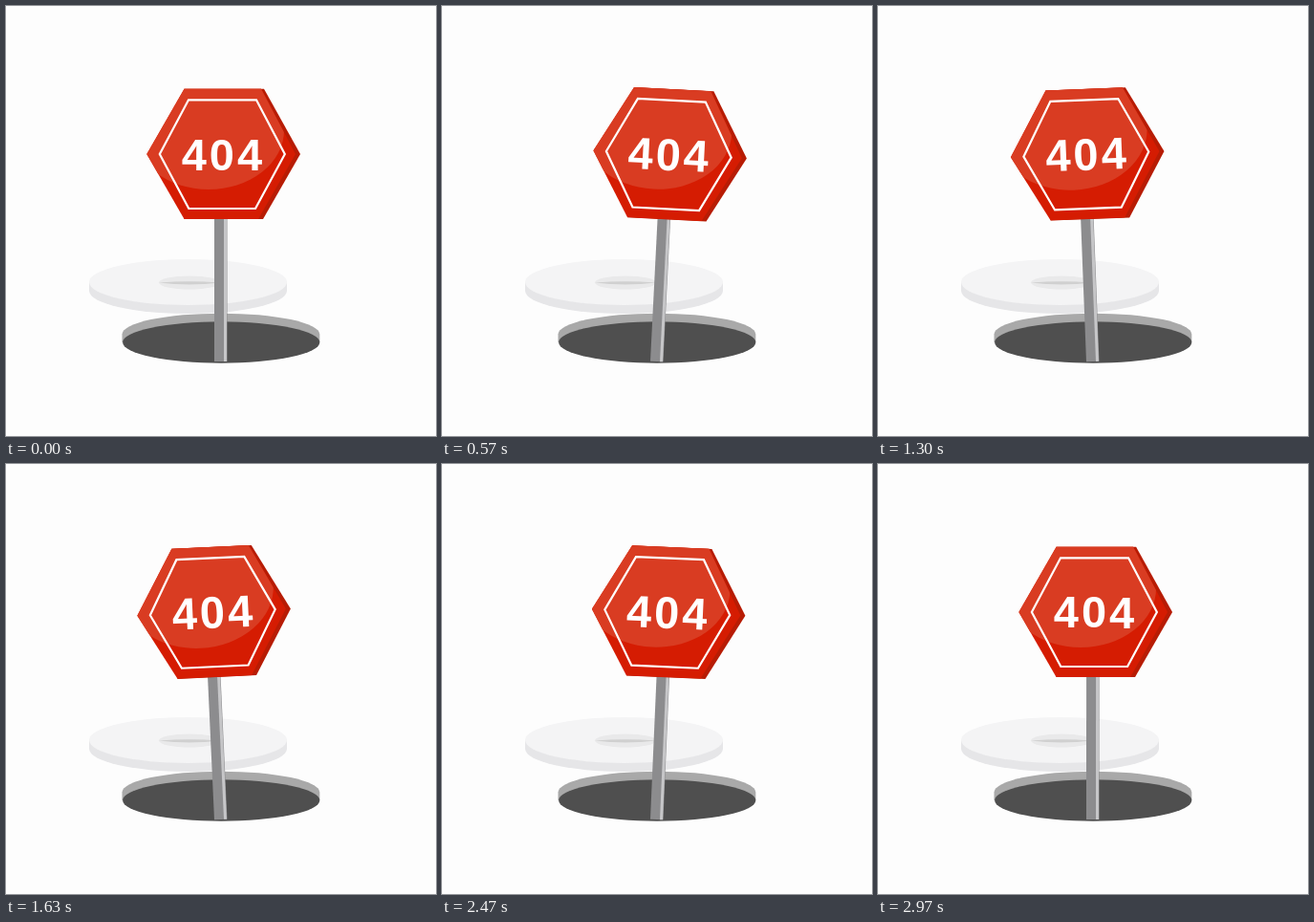
An HTML page for the animation above (3010 ms loop, 450 px wide and 450 px high).

```html
<!DOCTYPE html>
<html lang="en">
<head>
<meta charset="utf-8">
<title>404</title>
<style>
  html, body { margin: 0; width: 100%; height: 100%; overflow: hidden; background: #fdfdfd; }
  svg { display: block; width: 100%; height: 100%; }
  text { font: bold 47px "Liberation Sans", Arial, sans-serif; letter-spacing: 3px; fill: #fff; }
</style>
</head>
<body>
<svg viewBox="0 0 450 450">
  <defs>
    <clipPath id="face"><path d="M147.3 155 186.5 86.7H267L303 155 264 223H186.5Z"/></clipPath>
  </defs>

  <!-- lid -->
  <path fill="#e6e6e8" d="M87 289V298A103.5 24 0 0 0 294 298V289Z"/>
  <ellipse cx="190.5" cy="289" rx="103.5" ry="24" fill="#f4f4f5"/>
  <ellipse cx="192" cy="289.5" rx="32" ry="7" fill="#e9e9ea"/>
  <path fill="#d0d0d0" d="M160 289.5Q192 287 224 289.5Q192 293.5 160 289.5Z"/>

  <!-- hole -->
  <path fill="#a9a9a9" d="M121.5 352V343.5A103.4 21.8 0 0 1 328.3 343.5V352Z"/>
  <ellipse cx="225.2" cy="352" rx="103.1" ry="21.7" fill="#4f4f4f"/>

  <g id="sign">
    <path fill="#8c8c8e" d="M218 215H231.5V372H218Z"/>
    <path fill="#c6c6c8" d="M228 215H231V372H228Z"/>
    <path fill="#b71c04" d="M186.5 86.7H270L308 155 269 223H186.5Z"/>
    <g clip-path="url(#face)">
      <path fill="#d51c02" d="M140 80H312V230H140Z"/>
      <ellipse cx="212" cy="130" rx="79" ry="62" fill="#d93c22"/>
    </g>
    <path fill="none" stroke="#fff" stroke-width="2.2" d="M160.8 155 191 98.3H262L291.8 155 261 212H191.3Z"/>
    <text x="183.7" y="171.5">404</text>
  </g>
</svg>
<script>
  const LOOP = 3010, SWING = 3.25;
  // [step, angle]; each pair is joined by a smooth ease
  const keys = [[0, 0], [21.3, SWING], [44.9, -SWING], [66.8, SWING], [90, 0]];
  const sign = document.getElementById("sign");

  // 30 steps per second, with starts rounded to 10 ms
  function stepAt(ms) {
    const rest = ms % 100;
    const step = Math.floor(ms / 100) * 3 + (rest >= 30) + (rest >= 70);
    return Math.min(step, 89);
  }

  function angleAt(step) {
    const i = keys.findIndex(k => k[0] > step);
    const [s0, a0] = keys[i - 1], [s1, a1] = keys[i];
    const p = (step - s0) / (s1 - s0);
    return a0 + (a1 - a0) * p * p * (3 - 2 * p);
  }

  const start = performance.now();
  function draw() {
    const ms = (performance.now() - start) % LOOP;
    sign.setAttribute("transform", `rotate(${angleAt(stepAt(ms))} 225 372)`);
    requestAnimationFrame(draw);
  }
  draw();
</script>
</body>
</html>
```
